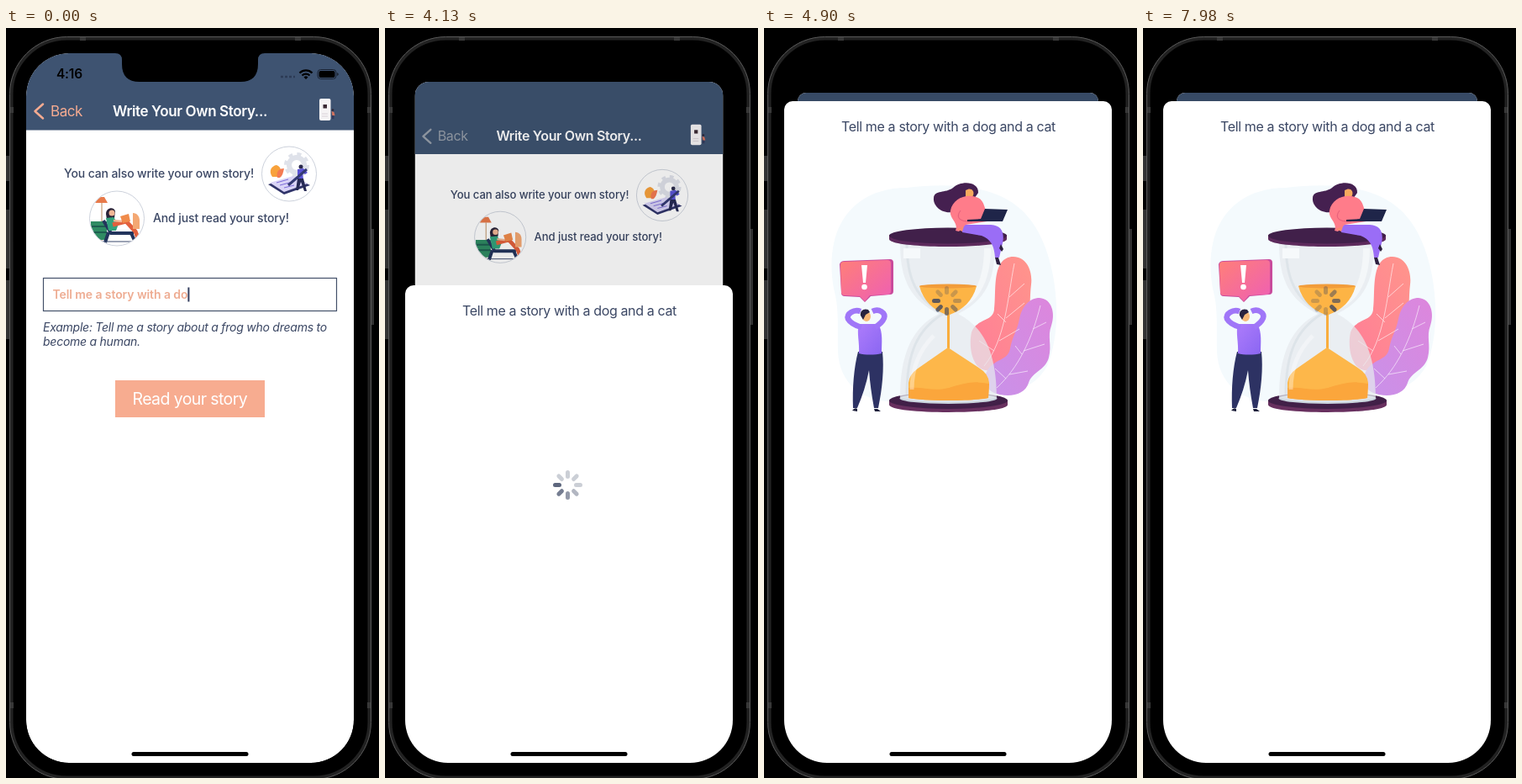
Animation, 444 px wide and 892 px high, one loop 8 s. Source, as an HTML page:

```html
<!DOCTYPE html>
<html lang="en">
<head>
<meta charset="utf-8">
<title>Story prompt</title>
<style>
html, body { margin: 0; height: 100%; overflow: hidden; background: #000; }
svg { display: block; width: 444px; height: 892px; font-family: Inter, Roboto, sans-serif; }
text { white-space: pre; fill: #3b4764; }
.title { font-size: 17px; font-weight: 600; letter-spacing: -.36px; fill: #fff; }
.note { font-size: 14px; font-weight: 500; letter-spacing: -.12px; }
.typed { font-size: 14px; font-weight: 600; letter-spacing: -.09px; fill: #eeac92; }
.hint { font-size: 14px; font-style: italic; letter-spacing: -.25px; }
.cta { font-size: 19.5px; letter-spacing: -.6px; fill: #fff; }
.prompt { font-size: 16px; letter-spacing: -.36px; }
</style>
</head>
<body>
<svg viewBox="0 0 444 892">
  <defs>
    <clipPath id="screen"><rect x="24" y="30" width="390" height="844" rx="51"/></clipPath>
    <clipPath id="card"><rect id="cardShape" x="24" y="30" width="390" height="844"/></clipPath>
    <clipPath id="c1"><circle cx="337" cy="173.500" r="32"/></clipPath>
    <clipPath id="c2"><circle cx="132" cy="226.500" r="32"/></clipPath>
    <linearGradient id="bubble" x2="1" y2="1"><stop stop-color="#ff7f78"/><stop offset="1" stop-color="#ee5fb4"/></linearGradient>
    <linearGradient id="leafA" x1="1" x2="0" y2="1"><stop stop-color="#ff958b"/><stop offset="1" stop-color="#ff7c98"/></linearGradient>
    <linearGradient id="leafB" x1="1" x2="0" y2="1"><stop stop-color="#dd86dc"/><stop offset="1" stop-color="#c892ea"/></linearGradient>
    <linearGradient id="shirt" x2="1" y2="1"><stop stop-color="#ad7cfb"/><stop offset="1" stop-color="#8a66f2"/></linearGradient>
  </defs>

  <!-- phone body -->
  <rect width="444" height="892"/>
  <g fill="#333">
    <path d="M0 152h4v30H0zM0 216h4v70H0zM0 300h4v70H0zM435 239h3v114h-3z"/>
  </g>
  <rect x="6.500" y="12.500" width="426" height="879" rx="66" fill="none" stroke="#222" stroke-width="4"/>
  <rect x="4.500" y="10.500" width="430" height="883" rx="68" fill="none" stroke="#5a5a5a"/>
  <path d="M88 11h7v4h-7zM344 11h7v4h-7zM5 94h4v7H5zM430 94h4v7h-4zM5 802h4v7H5zM430 802h4v7h-4z" fill="#383838"/>

  <g clip-path="url(#screen)">
    <g id="page"><g clip-path="url(#card)">
      <rect x="24" y="30" width="390" height="844" fill="#fff"/>
      <rect x="24" y="30" width="390" height="91.500" fill="#3e5371"/>
      <g id="back">
        <path d="M44 90.500 34.500 99l9.500 8.500" fill="none" stroke="currentColor" stroke-width="2.500" stroke-linecap="round" stroke-linejoin="round"/>
        <text x="53" y="105" style="font-size:17px;letter-spacing:-.43px;fill:currentColor">Back</text>
      </g>
      <text class="title" x="127" y="105">Write Your Own Story...</text>
      <g>
        <rect x="373" y="84" width="13.500" height="26" rx="2" fill="#f6f4f5"/>
        <rect x="377.500" y="91" width="4.500" height="4.500" fill="#3b2a34"/>
        <path d="M376 102h7M376 105h7" stroke="#d9d2d8"/>
        <circle cx="389" cy="97.500" r="1.300" fill="#2b2638"/>
        <path d="M387.500 99l3 1 1 4-3 1z" fill="#d3745f"/>
        <path d="M388 104h2.500v4H388z" fill="#333a5c"/>
      </g>

      <text class="note" x="69" y="178">You can also write your own story!</text>
      <text class="note" x="175" y="231">And just read your story!</text>

      <!-- writer -->
      <g clip-path="url(#c1)">
        <circle cx="346" cy="163" r="9" fill="none" stroke="#dfe2ea" stroke-width="6"/>
        <circle cx="346" cy="163" r="13" fill="none" stroke="#dfe2ea" stroke-width="4" stroke-dasharray="5 5.210"/>
        <path d="M317 177c-5-7-1-13 5-14 6 2 6 8 4 14z" fill="#f8a23c"/>
        <path d="M323 178c-2-8 3-11 8-11-1 5-2 9-5 11z" fill="#f47b52"/>
        <path d="M312 186l30-9 20 10-31 11z" fill="#30346a"/>
        <path d="M314 184l28-8 17 9-28 10z" fill="#d9d4f6"/>
        <path d="M322 184l14-4M326 187l15-4M331 190l12-3" stroke="#7c6bd8"/>
        <circle cx="351" cy="165" r="2.500" fill="#2a2a4c"/>
        <path d="M347 168l7-1 5 5-3 2-3-2 1 8h-7z" fill="#5a53d6"/>
        <path d="M347 179h7l4 15h-3l-4-11-3 10h-3z" fill="#262a55"/>
        <path d="M336 187l22-19" stroke="#343a74" stroke-width="3"/>
      </g>
      <circle cx="337" cy="173.500" r="32.500" fill="none" stroke="#bfc6d2" stroke-width=".8"/>

      <!-- reader -->
      <g clip-path="url(#c2)">
        <path d="M106 208l4-7h7l4 7z" fill="#e87a4a"/>
        <path d="M114 208v45" stroke="#b98a5a"/>
        <path d="M101 230h19v22h-19z" fill="#2f8b63"/>
        <path d="M101 236h19M101 243h19" stroke="#1d5d50" stroke-width="2"/>
        <path d="M116 229l9 15h27M122 243l-4 12M149 244l5 11" fill="none" stroke="#23345c" stroke-width="4"/>
        <path d="M119 221c0-8 10-9 11-3l-1 8-9 2z" fill="#2a2438"/>
        <circle cx="126" cy="220" r="3.500" fill="#f3b796"/>
        <path d="M119 226l9-1 6 8-3 8h-9z" fill="#32a37c"/>
        <path d="M127 234l16-4 11 12 4 10" fill="none" stroke="#e2603d" stroke-width="5" stroke-linejoin="round"/>
        <path d="M128 229l10 1" stroke="#f3b796" stroke-width="2.500"/>
        <path d="M136 224l10-3 2 9-9 2z" fill="#f08b4b"/>
        <path d="M151 220c5 0 8 4 8 9v10h-8z" fill="#f4a873"/>
        <path d="M103 254h58" stroke="#39466a"/>
      </g>
      <circle cx="132" cy="226.500" r="32.500" fill="none" stroke="#bfc6d2" stroke-width=".8"/>

      <rect x="44.500" y="297.500" width="349" height="39" fill="#fff" stroke="#435069" stroke-width="1.200"/>
      <text class="typed" id="typed" x="55.500" y="322"></text>
      <rect id="caret" y="308.500" width="2" height="17" fill="#343f60"/>
      <text class="hint" x="44" y="360.500">Example: Tell me a story about a frog who dreams to</text>
      <text class="hint" x="44" y="377.500">become a human.</text>
      <rect x="130" y="419" width="178" height="44" fill="#f7ac90"/>
      <text class="cta" x="150.500" y="448">Read your story</text>
      <rect id="dim" x="24" y="30" width="390" height="844"/>
    </g></g>

    <!-- status bar -->
    <g id="status">
      <text x="60" y="60" style="font-size:15.500px;font-weight:600;letter-spacing:-.2px;fill:#000">4:16</text>
      <path d="M327 58h3m2 0h3m2 0h3m2 0h2" stroke="#2c3b55" stroke-width="2.500"/>
      <path d="M349.500 53.500a10.500 10.500 0 0 1 15 0M352.500 56.500a6.500 6.500 0 0 1 9 0" fill="none" stroke="#000" stroke-width="2.300"/>
      <path d="M354.500 58.500a3.500 3.500 0 0 1 5 0L357 61z"/>
      <rect x="371" y="49.500" width="22" height="11" rx="3.500" fill="none" stroke="#1a2333"/>
      <rect x="372.500" y="51" width="19" height="8" rx="2"/>
      <path d="M394.500 53v4q2-2 0-4z"/>
    </g>
    <path d="M130 30q8 0 8 8v5q0 21 21 21h120q21 0 21-21v-5q0-8 8-8z"/>

    <!-- sheet, drawn at rest -->
    <g id="sheet">
      <rect x="24" y="87" width="390" height="900" rx="10" fill="#fff"/>
      <text class="prompt" x="92" y="122.500">Tell me a story with a dog and a cat</text>
      <g id="art">
        <path d="M83 310C70 235 108 190 170 190 235 182 292 190 320 232c28 40 38 120 17 170-27 50-95 25-155 38-50 14-92-8-94-55-1-30 2-50-5-75z" fill="#f4fafd"/>
        <!-- leaves -->
        <path d="M297 272c16 0 23 18 21 33s0 30-5 45 0 25-13 40c-10 12-30 22-42 15-12-7-14-30-11-43 6-17 25-12 27-27 3-20-4-63 23-63z" fill="url(#leafA)"/>
        <path d="M328 321c15 1 19 19 14 33-5 13 1 23-3 38s-20 17-24 30-19 17-34 14c-16-3-22-15-16-27 8-16 26-13 28-28 3-15 8-20 11-35 3-15 12-25 24-25z" fill="url(#leafB)"/>
        <g fill="none" stroke="#fff" stroke-width=".8" opacity=".75">
          <path d="M298 280c-8 40-10 90-36 122M292 320l18-16M288 345l22-18M278 340l10 10M280 372l24-14M256 372l18 12"/>
          <path d="M329 330c-10 40-26 74-52 98M320 358l16-8M309 384l25-8M299 378l8 10M292 412l22-4M275 405l13 12"/>
        </g>
        <!-- base -->
        <path d="M149 443v5c0 12 141 12 141 0v-5z" fill="#68305f"/>
        <ellipse cx="219.500" cy="443" rx="70.500" ry="10" fill="#412048"/>
        <ellipse cx="219.500" cy="440.500" rx="58" ry="6.500" fill="#c7d2dc"/>
        <!-- glass and sand -->
        <path d="M162 256c0 46 14 68 46 84-30 15-46 45-46 100 20 7 95 7 115 0 0-55-16-85-46-100 32-16 44-38 44-84z" fill="#e6ebef" opacity=".72"/>
        <path d="M170 256c0 44 12 66 43 84-30 18-43 46-43 96" fill="none" stroke="#d9e0e6" stroke-width="3" opacity=".7"/>
        <path d="M166 262h20v12h-20z" fill="#f6f9fb"/>
        <path d="M262 262c0 34-10 56-30 72 22-6 38-32 38-72z" fill="#f4f7f9"/>
        <path d="M185 307c5 18 16 28 32 34h4c16-6 27-16 32-34z" fill="#fdb445"/>
        <ellipse cx="219" cy="307" rx="34" ry="2.500" fill="#f29c3a"/>
        <path d="M219.500 338v48" stroke="#f9ad3d" stroke-width="3"/>
        <path d="M172 440v-18q1-10 11-17l36-25 38 25q10 6 11 17l-1 18c-20 4-76 4-95 0z" fill="#fdb74a"/>
        <path d="M172 440v-12c18-2 28 5 48 0 18-5 28-9 48-5l-1 17c-20 4-76 4-95 0z" fill="#fba63c"/>
        <path d="M176 430c0-26 10-48 26-64" fill="none" stroke="#fff" stroke-width="5" opacity=".35"/>
        <!-- lid -->
        <path d="M149 246v5c0 12 140 12 140 0v-5z" fill="#5d2a5c"/>
        <ellipse cx="219" cy="247" rx="70" ry="9.500" fill="#41204a"/>
        <!-- sitting woman -->
        <path d="M202 202c1-10 14-5 23-12 9-9 31-8 30 6l-7 10c-11-2-12 11-24 13-13 2-23-8-22-17z" fill="#452050"/>
        <path d="M240 193c6-4 11 0 9 6l-3 6-6-2z" fill="#f7a95e"/>
        <path d="M236 234h34c15 1 17 12 13 26l-3 13h-5c-1-14-5-22-16-26l-23-4z" fill="#9a6df6"/>
        <path d="M222 217c3-15 20-21 33-15 7 3 9 14 11 28l-26 4-8 8-4-1c4-10-8-14-6-24z" fill="#ff7c8a"/>
        <path d="M234 217c-6 8-2 14 14 13" fill="none" stroke="#e8627c" stroke-width="1.200"/>
        <path d="M263 215l27 1-6 14h-42v-2l16-1z" fill="#1f2549"/>
        <path d="M229 239l9-3-2 6z" fill="#f98a72"/>
        <path d="M275 273h4l3 9-5-1z" fill="#2d2040"/>
        <path d="M282 257l3 6-2 3-3-4z" fill="#2d2040"/>
        <!-- alert -->
        <path d="M96 277l54-2q4 0 4 4v34q0 4-4 4l-23 2-7 7-6-6-18-1q-4 0-4-4l-2-34q1-4 6-4z" fill="#c94a9c"/>
        <path d="M95 278l52-2q4 0 4 4v33q0 4-4 4l-21 1-6 7-6-6-18-1q-4 0-4-4l-1-32q0-4 4-4z" fill="url(#bubble)"/>
        <path d="M116 282h7l-2 21h-3z" fill="#fff"/><circle cx="119.500" cy="308" r="3.300" fill="#fff"/>
        <!-- worried man -->
        <path d="M112 385h29c2 20 0 43-5 67h-5c-3-16-5-31-6-45-3 16-8 31-14 45h-5c-1-24 1-48 6-67z" fill="#2d3263"/>
        <path d="M105 455q3-4 6-2v3zM131 453h4l4 3h-7z" fill="#1b1d38"/>
        <path d="M113 352h23c6 10 4 22 4 35-8 2-20 2-27 0 1-13-3-25 0-35z" fill="url(#shirt)"/>
        <path d="M115 337c-8-3-17 3-15 9 3 5 9 8 16 10M129 337c8-4 16 2 14 8-2 5-6 8-11 11" fill="none" stroke="#a076f8" stroke-width="6.500" stroke-linejoin="round"/>
        <ellipse cx="122" cy="343" rx="5" ry="6" fill="#f8b877"/>
        <path d="M115 342c-1-6 4-9 9-7l2 3-5 3-3 6z" fill="#28223f"/>
      </g>
      <g id="spinner" stroke="#36425f" stroke-width="5" stroke-linecap="round"></g>
    </g>
    <rect x="149.500" y="861" width="139" height="5" rx="2.500"/>
  </g>
</svg>
<script>
const LOOP = 8000, TICK = 70;
const PROMPT = 'Tell me a story with a dog and a cat';
const FIRST = 25;
const KEYS = [560, 840, 1400, 1540, 1680, 1820, 2100, 2240, 2450, 2520, 2730];
const $ = id => document.getElementById(id);
const mix = (a, b, p) => a + (b - a) * p;
const clamp = x => Math.min(1, Math.max(0, x));

const spokes = Array.from({ length: 8 }, (_, i) => {
  const line = document.createElementNS('http://www.w3.org/2000/svg', 'path');
  line.setAttribute('d', 'M0-10V-15');
  line.setAttribute('transform', `translate(217.5 324.5) rotate(${i * 45})`);
  $('spinner').append(line);
  return line;
});

// Critically damped spring from 0 to 1
function spring(ms) {
  const x = Math.max(0, ms) * .008;
  return ms > 1050 ? 1 : 1 - (1 + x) * Math.exp(-x);
}

function drawInput(t) {
  const typed = $('typed');
  typed.textContent = PROMPT.slice(0, FIRST + KEYS.filter(k => k <= t).length);
  $('caret').setAttribute('x', 55.5 + typed.getComputedTextLength());
  $('caret').setAttribute('opacity', t < 3430 ? 1 : clamp(.65 - (t - 3430) / 210));
}

function drawSheet(t) {
  const p = spring(t - 3812), s = mix(1, .918, p);
  $('page').setAttribute('transform', `translate(${219 * (1 - s)} ${mix(30, 77, p) - 30 * s}) scale(${s})`);
  $('cardShape').setAttribute('rx', mix(51, 11, clamp(p * 1.15)));
  $('dim').setAttribute('opacity', .11 * p);
  $('back').setAttribute('color', p > .02 ? '#98a0ab' : '#f5ab91');
  $('status').setAttribute('opacity', clamp(1 - 2 * p));
  $('sheet').setAttribute('transform', `translate(0 ${787 * (1 - p)})`);
  $('art').setAttribute('visibility', t >= 4410 ? 'visible' : 'hidden');
}

function drawSpinner(t) {
  const head = 7.95 + (t - 4270) / 103;
  spokes.forEach((line, i) => {
    const age = (((head - i) % 8) + 8) % 8;
    line.setAttribute('opacity', Math.max(.25, Math.min(.8, .92 - .15 * age)));
  });
}

function frame(now) {
  const t = Math.floor(now % LOOP / TICK) * TICK;
  drawInput(t);
  drawSheet(t);
  drawSpinner(t);
  requestAnimationFrame(frame);
}
frame(performance.now());
</script>
</body>
</html>
```
